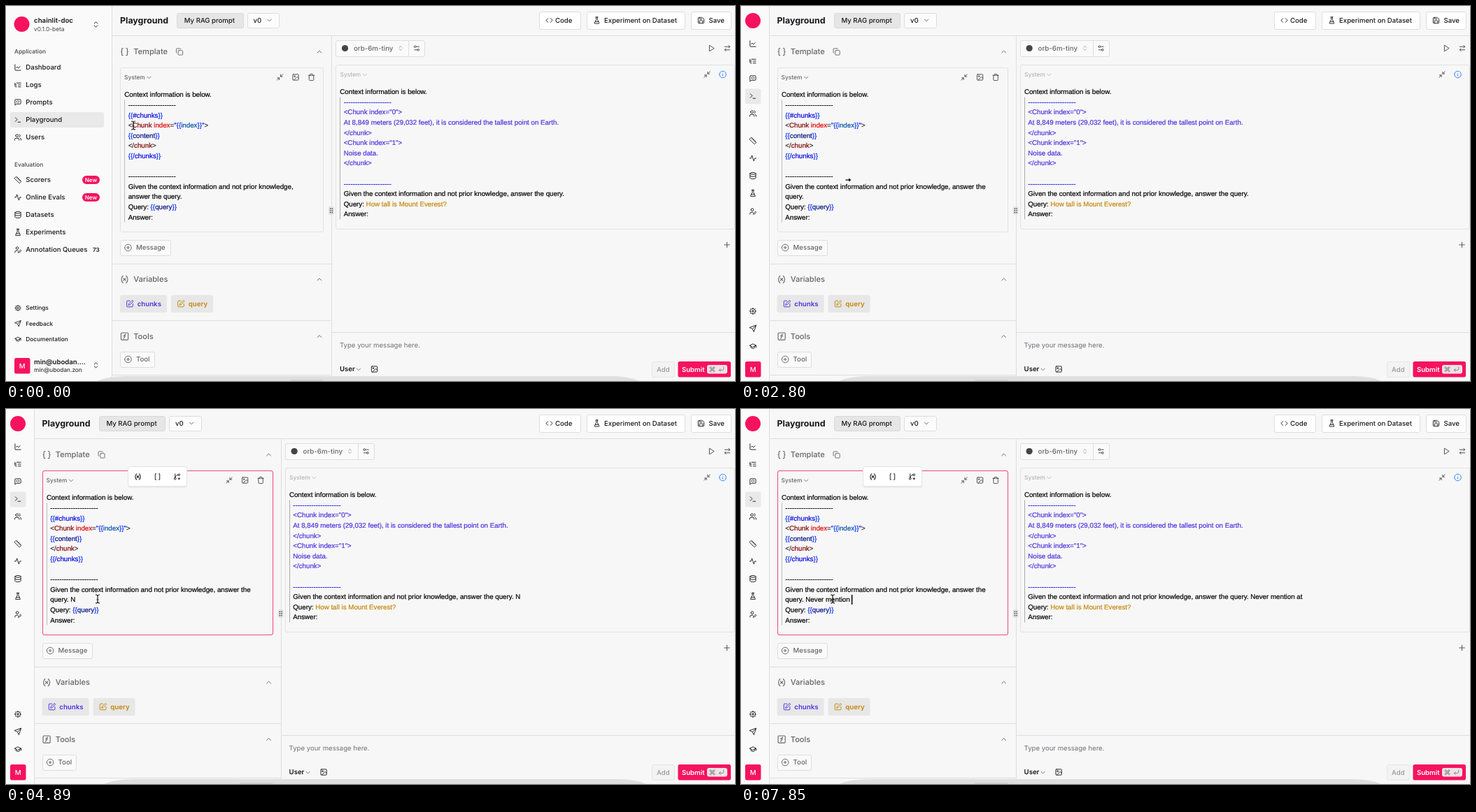
Animation of 1042 by 537 pixels, one loop 8 s. Source, as an HTML page:

```html
<!DOCTYPE html>
<html lang="en">
<head>
<meta charset="utf-8">
<title>Playground</title>
<style>
html, body { margin: 0; width: 100%; height: 100%; overflow: hidden; background: #f7f7f7; }
svg { display: block; width: 1042px; height: 537px; }
text { font-family: Inter, sans-serif; white-space: pre; text-rendering: geometricPrecision; }
.code { font: 9.74px "Liberation Sans", Arial, sans-serif; }
.code tspan { stroke: currentColor; stroke-width: .2px; }
</style>
</head>
<body>
<svg id="stage" viewBox="0 0 1042 537"></svg>
<script>
const PINK = '#f6125f', INK = '#18181b', GREY = '#666', EDGE = '#dedede';
const ring = (x, y, r) => `M${x - r} ${y}a${r} ${r} 0 1 0 ${2 * r} 0a${r} ${r} 0 1 0 ${-2 * r} 0`;
const box = 'M5 3h14a2 2 0 0 1 2 2v14a2 2 0 0 1-2 2H5a2 2 0 0 1-2-2V5a2 2 0 0 1 2-2z';

// Icon outlines on a 24 unit grid
const ICONS = {
  chart: 'M3 3v16a2 2 0 0 0 2 2h16M19 9l-5 5-4-4-3 3',
  tree: 'M21 12h-8M21 6H8M21 18h-8M3 6v4c0 1.1.9 2 2 2h3M3 10v6c0 1.1.9 2 2 2h3',
  chat: 'M21 15a2 2 0 0 1-2 2H7l-4 4V5a2 2 0 0 1 2-2h14a2 2 0 0 1 2 2zM10 7.5L8 10l2 2.5M14 7.5l2 2.5-2 2.5',
  prompt: 'M4 17l6-6-6-6M12 19h8',
  users: 'M16 21v-2a4 4 0 0 0-4-4H6a4 4 0 0 0-4 4v2M22 21v-2a4 4 0 0 0-3-3.9M16 3.1a4 4 0 0 1 0 7.8' + ring(9, 7, 4),
  ruler: 'M21.3 15.3a2.4 2.4 0 0 1 0 3.4l-2.6 2.6a2.4 2.4 0 0 1-3.4 0L2.7 8.7a2.4 2.4 0 0 1 0-3.4l2.6-2.6a2.4 2.4 0 0 1 3.4 0zM14.5 12.5l2-2M11.5 9.5l2-2M8.5 6.5l2-2M17.5 15.5l2-2',
  pulse: 'M22 12h-4l-3 9L9 3l-3 9H2',
  data: 'M3 5a9 3 0 1 0 18 0a9 3 0 1 0-18 0M3 5v14a9 3 0 0 0 18 0V5M3 12a9 3 0 0 0 18 0',
  flask: 'M10 2v7.5a2 2 0 0 1-.2.9L4.7 20.6a1 1 0 0 0 .9 1.4h12.8a1 1 0 0 0 .9-1.4L14.2 10.4a2 2 0 0 1-.2-.9V2M8.5 2h7M7 16h10',
  userPen: 'M11.5 15H7a4 4 0 0 0-4 4v2M21.4 16.6a1 1 0 0 0-3-3l-4 4-1.4 3.7 2.9-.8z' + ring(10, 7, 4),
  gear: ring(12, 12, 3) + ring(12, 12, 8) + 'M12 2v2M12 20v2M2 12h2M20 12h2M5 5l1.4 1.4M17.6 17.6L19 19M5 19l1.4-1.4M17.6 6.4L19 5',
  send: 'M22 2l-7 20-4-9-9-4zM22 2L11 13',
  cap: 'M2 10l10-5 10 5-10 5zM22 10v6M6 12v5c3 3 9 3 12 0v-5',
  sort: 'M7 15l5 5 5-5M7 9l5-5 5 5',
  down: 'M6 9l6 6 6-6',
  up: 'M18 15l-6-6-6 6',
  copy: 'M10 8h10a2 2 0 0 1 2 2v10a2 2 0 0 1-2 2H10a2 2 0 0 1-2-2V10a2 2 0 0 1 2-2zM4 16a2 2 0 0 1-2-2V4a2 2 0 0 1 2-2h10a2 2 0 0 1 2 2',
  braces: 'M8 3H7a2 2 0 0 0-2 2v5a2 2 0 0 1-2 2 2 2 0 0 1 2 2v5a2 2 0 0 0 2 2h1M16 21h1a2 2 0 0 0 2-2v-5a2 2 0 0 1 2-2 2 2 0 0 1-2-2V5a2 2 0 0 0-2-2h-1',
  shrink: 'M4 14h6v6M20 10h-6V4M14 10l7-7M3 21l7-7',
  image: box + ring(9, 9, 2) + 'M21 15l-3-3a2 2 0 0 0-3 0l-9 9',
  trash: 'M3 6h18M19 6v14a2 2 0 0 1-2 2H7a2 2 0 0 1-2-2V6M8 6V4a2 2 0 0 1 2-2h4a2 2 0 0 1 2 2v2',
  plus: 'M5 12h14M12 5v14',
  add: ring(12, 12, 10) + 'M8 12h8M12 8v8',
  play: 'M6 3l14 9-14 9z',
  swap: 'M16 3l4 4-4 4M20 7H4M8 21l-4-4 4-4M4 17h16',
  tune: 'M20 7h-9M14 17H5' + ring(17, 17, 3) + ring(7, 7, 3),
  info: ring(12, 12, 10) + 'M12 16v-4M12 8h.01',
  pen: 'M12 3H5a2 2 0 0 0-2 2v14a2 2 0 0 0 2 2h14a2 2 0 0 0 2-2v-7M18.4 2.6a2 2 0 0 1 3 3L12 15l-4 1 1-4z',
  code: 'M16 18l6-6-6-6M8 6l-6 6 6 6',
  save: 'M15.2 3a2 2 0 0 1 1.4.6l3.8 3.8a2 2 0 0 1 .6 1.4V19a2 2 0 0 1-2 2H5a2 2 0 0 1-2-2V5a2 2 0 0 1 2-2zM17 21v-7a1 1 0 0 0-1-1H8a1 1 0 0 0-1 1v7M7 3v4a1 1 0 0 0 1 1h7',
  func: box + 'M9 17c2 0 2.8-1 2.8-2.8V10c0-2 1-3.3 3.2-3M9 11.2h5.7',
  variable: 'M8 21s-4-3-4-9 4-9 4-9M16 3s4 3 4 9-4 9-4 9M15 9l-6 6M9 9l6 6',
  brackets: 'M16 3h3v18h-3M8 21H5V3h3',
  branch: 'M6 3v12M15 6a9 9 0 0 0-9 9M18 15v6M21 18h-6' + ring(18, 6, 3) + ring(6, 18, 3),
  command: 'M15 6v12a3 3 0 1 0 3-3H6a3 3 0 1 0 3 3V6a3 3 0 1 0-3 3h12a3 3 0 1 0-3-3',
  enter: 'M9 10l-5 5 5 5M20 4v7a4 4 0 0 1-4 4H4',
};

// Centre hairlines on whole pixels
const snap = v => Math.floor(v) + .5;

const icon = (name, x, y, size = 11, color = INK, weight = 2) =>
  `<path d="${ICONS[name]}" transform="translate(${x - size / 2} ${y - size / 2}) scale(${size / 24})" fill="none" stroke="${color}" stroke-width="${weight}" stroke-linecap="round" stroke-linejoin="round"/>`;
const rect = (x, y, x2, y2, fill, stroke = 'none', r = 2.5) => {
  if (stroke !== 'none') [x, y, x2, y2] = [x, y, x2, y2].map(snap);
  return `<rect x="${x}" y="${y}" width="${x2 - x}" height="${y2 - y}" rx="${r}" fill="${fill}" stroke="${stroke}"/>`;
};
const rule = (x, y, x2, y2, color = EDGE) =>
  `<path d="M${snap(x)} ${snap(y)}L${snap(x2)} ${snap(y2)}" stroke="${color}"/>`;
const dot = (x, y, r, fill) => `<circle cx="${x}" cy="${y}" r="${r}" fill="${fill}"/>`;
const label = (x, y, str, size = 9.6, weight = 500, color = INK, anchor = 'start') =>
  `<text x="${x}" y="${y + size * .36}" font-size="${size}" font-weight="${weight}" fill="${color}" text-anchor="${anchor}">${str}</text>`;

const esc = s => s.replace(/</g, '&lt;');
// parts alternate colour and text
function codeLine(x, y, parts) {
  let spans = '';
  for (let i = 0; i < parts.length; i += 2)
    spans += `<tspan fill="${parts[i]}" color="${parts[i]}">${esc(parts[i + 1])}</tspan>`;
  return `<text class="code ${parts.cls || ''}" x="${x}" y="${y + 3.2}">${spans}</text>`;
}
const codeBlock = (x, y, lines) => lines.map((parts, i) => codeLine(i ? x + 5.4 : x, y + 14.6 * i, parts)).join('');
const typed = (cls, str) => Object.assign(['#000', str], { cls });

const DASHES = '-'.repeat(21), BLUE = '#0431fa', NAVY = '#001080', MAROON = '#800000', DARK = '#333', VIOLET = '#4b32dd', GOLD = '#c4860c';
const GIVEN = 'Given the context information and not prior knowledge,';

const NAV = [['chart', 'Dashboard', 88, 54], ['tree', 'Logs', 113, 79], ['chat', 'Prompts', 138, 104],
  ['prompt', 'Playground', 163, 129], ['users', 'Users', 188, 154], ['ruler', 'Scorers', 249, 193],
  ['pulse', 'Online Evals', 274, 218], ['data', 'Datasets', 299, 243], ['flask', 'Experiments', 324, 268],
  ['userPen', 'Annotation Queues', 349, 294]];
const FOOT = [['gear', 'Settings', 432.5, 437], ['send', 'Feedback', 455, 462], ['cap', 'Documentation', 477, 487]];

function sidebar(slim) {
  const edge = slim ? 40 : 151.5;
  let s = rect(0, 0, edge, 537, '#fafafa', 'none', 0) + rule(edge, 0, edge, 537);
  s += slim ? rect(6, 118.5, 28.5, 140.5, '#e9e9e9') : rect(6, 152, 140, 174, '#e9e9e9');
  for (const [name, str, y, ySlim] of NAV) s += icon(name, 17, slim ? ySlim : y) + (slim ? '' : label(28.3, y, str));
  for (const [name, str, y, ySlim] of FOOT)
    s += icon(name, 17, slim ? ySlim : y, slim ? 11 : 10) + (slim ? '' : label(28.3, y, str, 8.3));
  if (slim) return s + dot(17, 21, 11, PINK) + rect(6, 509, 28.5, 531.5, PINK) + label(17.2, 520.3, 'M', 9.7, 500, '#fff', 'middle');
  s += dot(22.5, 26, 11, PINK) + label(40, 20.5, 'chainlit-doc', 9.7, 600) + label(40, 32.5, 'v0.1.0-beta', 8.34, 400, '#444');
  s += label(12, 65, 'Application', 8.34, 500, '#444') + label(12, 226.5, 'Evaluation', 8.34, 500, '#444');
  for (const y of [249, 274]) s += rect(109, y - 6, 134, y + 6, PINK, 'none', 6) + label(121.5, y, 'New', 8, 600, '#fff', 'middle');
  s += label(124, 349, '73', 8.2, 600);
  s += rect(12, 504, 34.5, 526.5, PINK) + label(23.2, 515.3, 'M', 9.7, 500, '#fff', 'middle');
  s += label(40, 509.5, 'min@ubodan....', 9.6, 600) + label(40, 520.5, 'min@ubodan.zon', 8.34, 400);
  return s + icon('sort', 128.5, 26.5) + icon('sort', 128.5, 514.5);
}

function header(dx) {
  return rule(151.5 + dx, 42.5, 1042, 42.5)
    + label(163 + dx, 20.5, 'Playground', 12.4, 700)
    + rect(244.5 + dx, 10.5, 339 + dx, 31, '#e6e6e6', '#dadada') + label(254.8 + dx, 20.5, 'My RAG prompt')
    + rect(345 + dx, 10.5, 390.5 + dx, 31, '#fcfcfc', EDGE) + label(353.5 + dx, 20.5, 'v0') + icon('down', 376.5 + dx, 20.5, 11, GREY)
    + rect(762.5, 8.5, 821.5, 33, '#fff', EDGE) + icon('code', 776.5, 20.5) + label(785, 20.5, 'Code')
    + rect(830.5, 8.5, 970, 33, '#fff', EDGE) + icon('flask', 844.5, 20.5) + label(855, 20.5, 'Experiment on Dataset')
    + rect(979.5, 8.5, 1036, 33, '#fff', EDGE) + icon('save', 993.5, 20.5) + label(1004.5, 20.5, 'Save');
}

function editor(slim, dx, rx) {
  const x = 163.5 + dx, right = 453.5 + rx, split = 465.5 + rx;
  const section = (name, str, y) => icon(name, x + 6, y, 13.5, GREY) + label(x + 18.7, y, str, 11.1, 500, GREY) + icon('up', 448 + rx, y, 11.5, GREY);
  const button = (str, y, w) => rect(x, y - 10.5, x + w, y + 11, '#fafafa', EDGE) + icon('add', x + 11, y, 11.5, GREY) + label(x + 22.5, y, str, 9.6, 500, GREY);
  const chip = (str, cx, w, color) => rect(cx, 414, cx + w, 439, '#e7e7e7') + icon('pen', cx + 14, 426.5, 11.5, color) + label(cx + 24.7, 426.5, str, 9.7, 600, color);
  let s = section('braces', 'Template', 65.5) + icon('copy', 248 + dx, 65.5, 11, GREY);
  s += rect(x, 88, right, 323.5, 'none', '#e2e2e2');
  if (slim) s += `<g id="focus">${rect(x, 88, right, 323.5, 'none', '#f04a72')}${rect(174.5, 83.5, 258.5, 112, '#e9e9e9', '#ececec')}${rect(174.5, 82.5, 258.5, 110.5, '#fff', '#e4e4e4')}${icon('variable', 188.5, 97, 11, INK, 2.4)}${icon('brackets', 216.5, 97)}${icon('branch', 244.5, 97)}</g>`;
  s += label(x + 5.5, 102, 'System', 8.34, 500, GREY) + icon('down', x + 41, 102.5, 10.5, GREY);
  s += icon('shrink', 391.5 + rx, 102, 11, '#444') + icon('image', 414 + rx, 102, 11, '#444') + icon('trash', 436.5 + rx, 102, 11, '#444');
  s += rule(x + 6, 134.5, x + 6, 309, '#bbb');
  s += codeBlock(x + 5.8, 127.1, [
    ['#000', 'Context information is below.'],
    ['#000', DASHES],
    [BLUE, '{{', '#0000e0', '#chunks', BLUE, '}}'],
    [DARK, '<', MAROON, 'Chunk', '#e50000', ' index', DARK, '=', '#0000ff', '"', BLUE, '{{', '#0451a5', 'index', BLUE, '}}', '#0000ff', '"', DARK, '>'],
    [BLUE, '{{', NAVY, 'content', BLUE, '}}'],
    [DARK, '</', MAROON, 'chunk', DARK, '>'],
    [BLUE, '{{', '#0000e0', '/chunks', BLUE, '}}'],
    [],
    ['#000', DASHES],
    ['#000', GIVEN + (slim ? ' answer the' : '')],
    slim ? typed('draft', 'query.') : ['#000', 'answer the query.'],
    ['#000', 'Query: ', BLUE, '{{', NAVY, 'query', BLUE, '}}'],
    ['#000', 'Answer:'],
  ]);
  s += button('Message', 346, 71.5) + section('variable', 'Variables', 391.5);
  s += chip('chunks', x - .5, 67, VIOLET) + chip('query', x + 72.5, 60, GOLD);
  s += section('func', 'Tools', 473) + button('Tool', 506, 48.5);
  for (const y of [369.5, 450.5, 528.5]) s += rule(151.5 + dx, y, split, y);
  return s + rule(split, 43, split, 537);
}

function output(slim, rx) {
  const x = 471.5 + rx;
  let s = rect(x, 49.5, x + 127, 72, '#fafafa', EDGE) + rule(x + 104, 49.5, x + 104, 72);
  s += dot(x + 13, 60.5, 4.6, '#444') + label(x + 25.5, 60.5, 'orb-6m-tiny', 9.7, 500, GREY);
  s += icon('sort', x + 92.5, 60.5, 9, '#888') + icon('tune', x + 115.5, 60.5, 11, '#444');
  s += icon('play', 1008.5, 60.5, 11, '#444') + icon('swap', 1031, 60.5, 11, '#444');
  s += rect(x, 84, 1041.5, 319.5, 'none', '#e2e2e2');
  s += label(x + 6, 98, 'System', 8.34, 500, '#b4b4b4') + icon('down', x + 41.2, 98.5, 10.5, '#b4b4b4');
  s += icon('shrink', 1002, 98, 11, '#444') + icon('info', 1024.5, 98, 11.5, '#2b7fff');
  s += rule(x + 6.2, 130.5, x + 6.2, 305, '#aaa');
  const query = GIVEN + ' answer the query.';
  s += codeBlock(x + 5.8, 123, [
    ['#000', 'Context information is below.'],
    ['#1414ff', DASHES],
    [VIOLET, '<Chunk index="0">'],
    [VIOLET, 'At 8,849 meters (29,032 feet), it is considered the tallest point on Earth.'],
    [VIOLET, '</chunk>'],
    [VIOLET, '<Chunk index="1">'],
    [VIOLET, 'Noise data.'],
    [VIOLET, '</chunk>'],
    [],
    ['#1414ff', DASHES],
    slim ? typed('echo', query) : ['#000', query],
    ['#000', 'Query: ', GOLD, 'How tall is Mount Everest?'],
    ['#000', 'Answer:'],
  ]);
  s += icon('plus', 1030.5, 342, 13, '#555', 1.8) + rule(x - 6, 467, 1042, 467);
  s += label(x + 5.5, 485.5, 'Type your message here.', 9.6, 400, '#71717a');
  s += label(x + 5.5, 520, 'User', 9.6, 600) + icon('down', x + 32.5, 520.5, 10.5, GREY) + icon('image', x + 55, 520, 11);
  s += rect(923.5, 509.5, 955, 531, '#f3f3f3', '#e6e6e6') + label(930, 520.3, 'Add', 9.6, 500, '#999');
  s += rect(960.5, 509, 1036, 531.5, PINK) + label(966, 520.3, 'Submit', 9.6, 600, '#fff');
  s += rect(1002, 514, 1031, 526.5, '#eee3e6', 'none', 3) + icon('command', 1009.5, 520.3, 9.5, '#777') + icon('enter', 1022.5, 520.3, 9.5, '#777');
  s += rect(x - 10.5, 287, x - 2.5, 299, '#e2e2e2');
  for (let i = 0; i < 6; i++) s += dot(x - 7.8 + i % 2 * 2.6, 290.2 + (i >> 1) * 2.8, .8, '#222');
  return s;
}

function scene(slim) {
  const dx = slim ? -111.4 : 0, rx = slim ? -72.4 : 0;
  return `<g id="${slim ? 'slim' : 'wide'}">${rect(0, 0, 1042, 537, '#f7f7f7', 'none', 0)}`
    + sidebar(slim) + header(dx) + editor(slim, dx, rx) + output(slim, rx)
    + `<path d="M130 537Q147 530 172 530H865Q890 530 905 537z" fill="#dfdfdf" transform="translate(${slim ? 10 : 0} 0)"/>`
    + rect(407 + rx, 535, 453.5 + rx, 537, '#d2d2d2', 'none', 0) + '</g>';
}

const POINTERS = {
  beam: '<path d="M-3-6Q0-6 0-4Q0-6 3-6M0-4V4M-3 6Q0 6 0 4Q0 6 3 6M-1.5 1H1.5" fill="none" stroke="#222" stroke-width="1.2"/>',
  west: '<path d="M-4.5 0L-.8-3V-.9H4V.9H-.8V3z" stroke="#fff" stroke-width=".5"/>',
  east: '<path d="M4.5 0L.8-3V-.9H-4V.9H.8V3z" stroke="#fff" stroke-width=".5"/>',
  arrow: '<path d="M0 0V11L2.6 8.6 4.2 12.2 6 11.4 4.4 8H8z" stroke="#fff" stroke-width=".8"/>',
};

const stage = document.getElementById('stage');
stage.innerHTML = scene(false) + scene(true)
  + '<rect id="caret" y="266" width="1.5" height="14"/>'
  + '<g id="pointer">' + Object.keys(POINTERS).map(k => `<g id="${k}">${POINTERS[k]}</g>`).join('') + '</g>';
const el = id => document.getElementById(id);
const show = (id, on) => el(id).setAttribute('display', on ? 'inline' : 'none');
const draft = stage.querySelector('.draft tspan'), echo = stage.querySelector('.echo tspan');

const LOOP = 8000, FOLD = 2800, FOCUS = 3550;
const PATH = [[0, 182, 171], [200, 182, 171], [1330, 152, 248], [1580, 152, 248], [2050, 201, 271], [2350, 146, 253],
  [2500, 153, 249], [2800, 153, 249], [2950, 176, 267], [3400, 131, 272], [LOOP, 131, 272]];
const PHRASE = ' Never mention at the';
// time, letters in the draft, letters in the delayed echo
const KEYS = [[0, 0, 0], [4140, 1, 0], [4440, 2, 2], [5640, 3, 2], [5790, 4, 3], [5940, 5, 4], [6080, 6, 5], [6220, 7, 5],
  [6370, 8, 6], [6520, 10, 6], [6670, 11, 10], [6820, 12, 11], [6970, 14, 12], [7120, 16, 14], [7260, 18, 16],
  [7410, 20, 19], [7700, 17, 19], [7850, 15, 17]];

function pointerAt(t) {
  const i = PATH.findIndex(p => p[0] > t), [t0, x0, y0] = PATH[i - 1], [t1, x1, y1] = PATH[i];
  const k = (t - t0) / (t1 - t0);
  return [x0 + (x1 - x0) * k, y0 + (y1 - y0) * k];
}

function draw(t) {
  const slim = t >= FOLD;
  show('wide', !slim);
  show('slim', slim);
  show('focus', t >= FOCUS);

  const [, left, right] = KEYS.filter(k => k[0] <= t).pop();
  draft.textContent = 'query.' + PHRASE.slice(0, left);
  echo.textContent = GIVEN + ' answer the query.' + PHRASE.slice(0, right);
  const caretOn = t >= FOCUS && !(t >= 4890 && t < 5340);
  show('caret', caretOn);
  if (caretOn) el('caret').setAttribute('x', 62.8 + draft.getComputedTextLength());

  const [x, y] = pointerAt(t);
  const shape = slim && t >= 2900 || x > 157 ? 'beam' : x < 149 ? 'arrow' : t < 2500 ? 'west' : 'east';
  for (const k in POINTERS) show(k, k === shape);
  el('pointer').setAttribute('transform', `translate(${x} ${y})`);
}

const start = performance.now();
function tick() {
  draw((performance.now() - start) % LOOP);
  requestAnimationFrame(tick);
}
tick();
</script>
</body>
</html>
```
